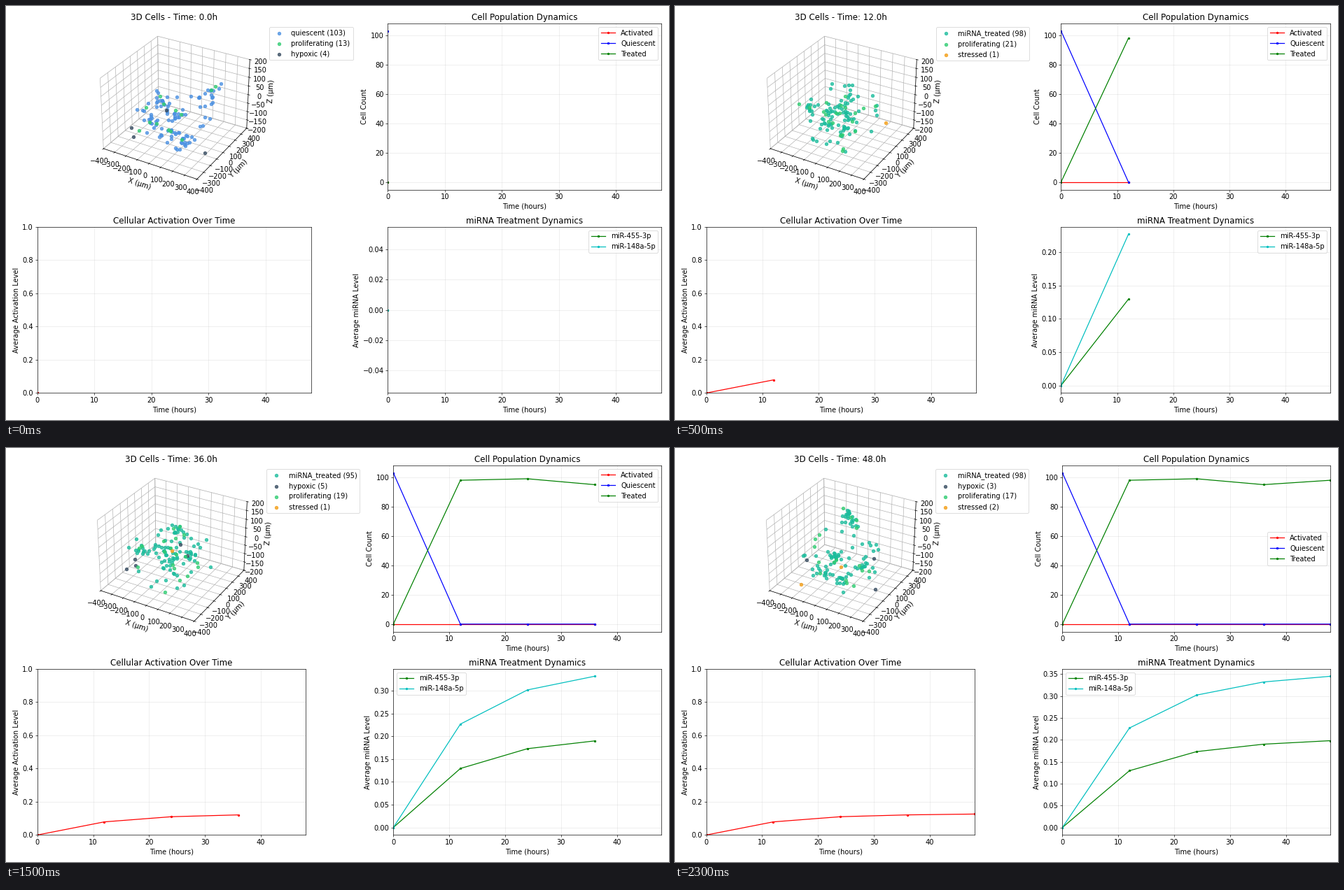
These frames come from a looping animation (947 px wide and 592 px high, 2500 ms). A matplotlib script:

```python
import numpy as np
import matplotlib.pyplot as plt
from matplotlib.animation import FuncAnimation

W, H, DPI = 947, 592, 59.1875
plt.rcParams.update({"font.family": "DejaVu Sans", "font.size": 12})

# Panel layout in stage pixels, measured from the top left
LEFT, RIGHT, TOP, LOW, SIDE = 44.7, 936.4, 24.8, 315.6, 237.8

HOURS = np.arange(0, 49, 12)
ACTIVATION = [("Activation", "r", [0, 0.079, 0.110, 0.121, 0.126])]
POPULATION = [
    ("Activated", "r", [0, 0, 0, 0, 0]),
    ("Quiescent", "b", [103, 0, 0, 0, 0]),
    ("Treated", "g", [0, 98, 99, 95, 98]),
]
MIRNA = [
    ("miR-455-3p", "g", [0, 0.1295, 0.173, 0.190, 0.198]),
    ("miR-148a-5p", "c", [0, 0.227, 0.302, 0.332, 0.345]),
]
COLORS = {
    "quiescent": "#4a90e2",
    "proliferating": "#2ecc71",
    "hypoxic": "#34495e",
    "miRNA_treated": "#1abc9c",
    "stressed": "#f39c12",
}

# Per time step: clump centres on the stage, then each group as either
# a head count (cells scattered at random) or the places of a few rare cells
COLONIES = [
    ([(292, 125), (222, 140), (243, 155), (211, 163), (236, 176), (250, 190)],
     {"quiescent": 103, "proliferating": 13,
      "hypoxic": [(182, 173), (184, 185), (230, 149), (282, 207)]}),
    ([(241, 136), (222, 150), (220, 168), (248, 156), (246, 177), (193, 142)],
     {"miRNA_treated": 98, "proliferating": 21, "stressed": [(299, 166)]}),
    ([(265, 123), (208, 134), (228, 157), (245, 173), (262, 168), (243, 148)],
     {"miRNA_treated": 99, "proliferating": 14,
      "hypoxic": [(233, 149), (238, 153), (303, 181), (277, 202)],
      "stressed": [(200, 163), (180, 184), (294, 202)]}),
    ([(247, 120), (193, 143), (220, 140), (240, 150), (232, 164), (262, 155)],
     {"miRNA_treated": 95,
      "hypoxic": [(186, 158), (187, 167), (175, 172), (249, 138), (258, 153)],
      "proliferating": 19, "stressed": [(237, 147)]}),
    ([(247, 97), (253, 110), (230, 155), (216, 173), (242, 187), (264, 167)],
     {"miRNA_treated": 98,
      "hypoxic": [(190, 159), (282, 157), (284, 200)],
      "proliferating": 17, "stressed": [(182, 193), (237, 169)]}),
]

# Screen right and screen up in the default 3D view
VIEW_RIGHT = np.array([0.75 ** 0.5, 0.5, 0])
VIEW_UP = np.array([-0.25, 0.75 ** 0.5 / 2, 0.75 ** 0.5])

fig = plt.figure(figsize=(W / DPI, H / DPI), dpi=DPI)


def panel(x, top, width, **kw):
    return fig.add_axes(
        [x / W, 1 - (top + SIDE) / H, width / W, SIDE / H], **kw)


def scatter_cells(rng, n, clumps):
    """Two thirds of the cells gather in clumps, the rest fill a wide disc."""
    loose = n // 3
    centres = np.resize(clumps, (n - loose, 2))
    dense = centres + rng.normal(size=centres.shape) * (6, 5)
    angle = rng.uniform(0, 2 * np.pi, loose)
    radius = np.sqrt(rng.uniform(0, 1, loose))
    disc = np.c_[240 + 56 * radius * np.cos(angle),
                 158 + 48 * radius * np.sin(angle)]
    return np.vstack([dense, disc])


def to_space(pts, x_origin):
    """Stage pixels to data coordinates on the plane facing the viewer."""
    a = (pts[:, 0] - x_origin) / SIDE * 1.85 - 0.95
    b = (TOP + SIDE - pts[:, 1]) / SIDE * 1.85 - 0.95
    pos = np.outer(a, VIEW_RIGHT) + np.outer(b, VIEW_UP)
    return (pos * [700, 700, 1400 / 3]).T


def draw_cells(i, width):
    ax = panel(LEFT, TOP, width, projection="3d")
    x_origin = LEFT + (width - SIDE) / 2
    rng = np.random.default_rng(i + 3)
    clumps, groups = COLONIES[i]
    for name, cells in groups.items():
        if isinstance(cells, int):
            cells = scatter_cells(rng, cells, clumps)
        pts = np.array(cells, float)
        ax.scatter(*to_space(pts, x_origin), c=COLORS[name], s=30, alpha=0.8,
                   depthshade=False, label=f"{name} ({len(pts)})")
    ax.set_xticks(range(-400, 401, 100))
    ax.set_yticks(range(-400, 401, 100))
    ax.set_zticks(range(-200, 201, 50))
    ax.set(xlim=(-400, 400), ylim=(-400, 400), zlim=(-200, 200),
           xlabel="X (µm)", ylabel="Y (µm)", zlabel="Z (µm)")
    for axis in (ax.xaxis, ax.yaxis, ax.zaxis):
        axis.pane.fill = False
    # 3D axes scale the title height by 0.92
    ax.set_title(f"3D Cells - Time: {HOURS[i]:.1f}h", y=1 / 0.92)
    ax.legend(loc="upper left", bbox_to_anchor=(1.05, 1))


def draw_curves(ax, i, curves, title, ylabel, loc=None):
    for label, color, values in curves:
        ax.plot(HOURS[:i + 1], values[:i + 1], color=color, marker="o",
                markersize=3, label=label)
    ax.set(xlim=(0, 48), xlabel="Time (hours)", ylabel=ylabel)
    ax.set_title(title, y=1.0)
    ax.grid(alpha=0.3)
    if loc:
        ax.legend(loc=loc)


def draw(i):
    fig.clf()
    width = 383 + 8 * 0.25 ** i  # the layout settles as the labels change
    right_x = RIGHT - width
    draw_cells(i, width)
    draw_curves(panel(right_x, TOP, width), i, POPULATION,
                "Cell Population Dynamics", "Cell Count",
                "center right" if i == 4 else "upper right")
    ax = panel(LEFT, LOW, width)
    draw_curves(ax, i, ACTIVATION,
                "Cellular Activation Over Time", "Average Activation Level")
    ax.set_ylim(0, 1)
    draw_curves(panel(right_x, LOW, width), i, MIRNA,
                "miRNA Treatment Dynamics", "Average miRNA Level",
                "upper left" if i > 2 else "upper right")
    return fig.axes


anim = FuncAnimation(fig, draw, frames=len(HOURS), interval=500,
                     init_func=lambda: [], repeat=True, repeat_delay=0)
plt.show()
```
